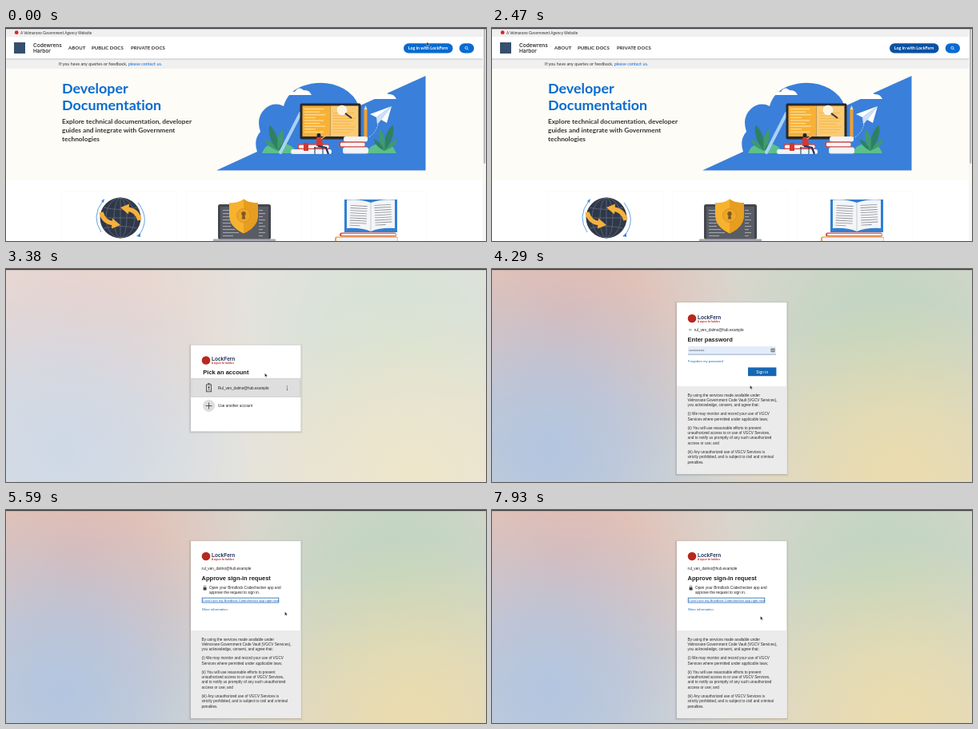
Recreate the animation shown at these times as an HTML page. Size 600 by 267 pixels, loop 8000 ms.

```html
<!DOCTYPE html>
<html lang="en">
<head>
<meta charset="utf-8">
<title>Sign-in walkthrough</title>
<style>
  html, body { margin: 0; width: 100%; height: 100%; overflow: hidden; background: #fff; }
  svg { display: block; width: 100vw; height: 100vh; }
  text { white-space: pre; font-variant-ligatures: none; }
  .lato { font-family: Lato, "Open Sans", sans-serif; }
  .inter { font-family: Inter, Roboto, sans-serif; font-weight: 600; }
  .arial { font-family: "Liberation Sans", Arial, sans-serif; }
  .b { font-weight: 700; }
</style>
</head>
<body>
<svg id="stage" viewBox="0 0 600 267" preserveAspectRatio="none"></svg>
<script>
const LOOP = 8000, STEP = 130;
const TO_ACCOUNT = 2990, TO_PASSWORD = 4160, TO_APPROVE = 5590;
const BLUE = '#086bd0', LINK = '#1068b8';
const NAMES = { land: 'Velmorane', pass: 'LockFern', mail: 'ul_ven_dalmo@hub.example' };

const rect = (x, y, w, h, fill, extra = '') =>
  `<rect x="${x}" y="${y}" width="${w}" height="${h}" fill="${fill}" ${extra}/>`;
const circle = (x, y, r, fill, extra = '') =>
  `<circle cx="${x}" cy="${y}" r="${r}" fill="${fill}" ${extra}/>`;
const path = (d, fill, extra = '') => `<path d="${d}" fill="${fill}" ${extra}/>`;
const line = (d, color, width = 1, extra = '') =>
  path(d, 'none', `stroke="${color}" stroke-width="${width}" ${extra}`);
const text = (x, y, size, str, fill = '#222', cls = 'arial', extra = '') =>
  `<text x="${x}" y="${y}" font-size="${size}" fill="${fill}" class="${cls}" ${extra}>${str}</text>`;
const group = (id, body, extra = '') => `<g id="${id}" ${extra}>${body}</g>`;
const rows = (n, draw) => Array.from({ length: n }, (_, i) => draw(i)).join('');

function leaf(x, y, angle, length, fill) {
  const w = length * 0.24;
  return path(`M0 0Q${-w} ${-length * .6} 0 ${-length}Q${w} ${-length * .6} 0 0`, fill,
    `transform="translate(${x} ${y}) rotate(${angle})"`);
}

function book(x, y, w, h, cover) {
  return rect(x, y, w, h, cover, 'rx="2.5"') +
    rect(x + 2, y + 1.2, w - 2.5, h - 2.4, '#f4f5f7', 'rx="1.5"');
}

function heroArt() {
  const plant = (x, y, dir) => [-50, -18, 12, 42].map((a, i) =>
    leaf(x, y, a * dir, [22, 34, 28, 20][i], i % 2 ? '#2f8062' : '#3f9a6d')).join('');
  const cloud = (x, y) => path(`M${x} ${y}Q${x + 4} ${y - 5} ${x + 9} ${y - 4}Q${x + 14} ${y - 12}
    ${x + 20} ${y - 6}Q${x + 27} ${y - 7} ${x + 30} ${y}Z`, '#fff');
  return path(`M263 178.5L314 155Q309 140 318 130Q312 112 324 101Q335 92 347 98Q352 80 370 73
      Q398 63 422 76Q436 84 441 98L524.5 60V178.5Z`, '#3a7fd9') +
    cloud(352, 84) + cloud(458, 89) +
    path('M320 157Q325 143 339 147Q350 139 366 157Z', '#5cc08c') +
    path('M450 157Q458 142 470 147Q482 142 488 157Z', '#5cc08c') +
    plant(340, 154, 1) + plant(473, 154, -1) +
    line('M343 156L368 107', '#a9d2f5', 4, 'stroke-linecap="round"') +
    rect(367.5, 94.5, 76, 45, '#26282f', 'rx="2"') +
    rect(370.5, 97.5, 35, 38.5, '#f9b135') + rect(405.5, 97.5, 35, 38.5, '#fbcb74') +
    rows(9, i => rect(373, 101 + i * 3.6, [24, 19, 26, 14][i % 4], 1.1, '#fde3a6')) +
    rows(8, i => rect(409, 106 + i * 3.5, [26, 22, 28][i % 3], .9, '#f6b548')) +
    circle(420, 103, 5.6, '#fff4dc', 'stroke="#f7f8fa" stroke-width="1.4"') +
    line('M424 107L432 113', '#2c3140', 2) +
    rect(447.5, 102, 4, 36, '#f3a12e') + path('M447.5 102L449.5 97L451.5 102Z', '#f9dcb0') +
    line('M465 121Q461 134 451 138', '#cfe3fa', .8, 'stroke-dasharray="2 1.5"') +
    path('M482 98L455 108L463 112Z', '#fff') + path('M482 98L463 112L464 121L469 115Z', '#cfe0f4') +
    path('M482 98L469 115L476 119Z', '#fff') +
    book(422, 136, 30, 6.5, '#f0f1f4') + book(416, 142.5, 33, 7, '#d4493f') +
    book(421, 149.5, 32, 8, '#e9ebef') +
    book(364, 145.5, 40, 6.5, '#d4493f') + book(356, 152, 51, 6, '#e9ebef') +
    rect(372, 144, 6, 10, '#d2382f') +
    line('M386 149V158M396 149V158M385 150H397', '#263250', 1) +
    path('M388 138Q391 134 395 138L396 148H388Z', '#d5372f') +
    line('M394 139L403 133', '#f2b18c', 1.3) + line('M390 148L400 150L403 158', '#22345f', 2.2) +
    circle(391, 134.5, 2.5, '#1f2333');
}

function globe() {
  const arrow = line('M119 231Q122 244 135 245', '#f6b13c', 5.5) + path('M133 238.5L143 247L132 251.5Z', '#f6b13c');
  return circle(143, 238, 25.5, '#303848') +
    [8, 18].map(r => `<ellipse cx="143" cy="238" rx="${r}" ry="25" fill="none" stroke="#65718a" stroke-width=".7"/>`).join('') +
    line('M143 213V263M118 238H168M122 225Q143 230 164 225M122 251Q143 246 164 251', '#65718a', .7) +
    arrow + group('returnArrow', arrow, 'transform="rotate(180 143 236)"') +
    line('M121 217Q106 236 119 256M165 219Q181 240 166 260', '#3b87d8', .8) +
    path('M119 217L123 214L122 219ZM163 261L168 257L168 262Z', '#3b87d8');
}

function laptop() {
  return rect(265, 221, 66, 44, '#44464d', 'rx="2.5"') + rect(268, 224, 60, 41, '#5a5c64') +
    rows(9, i => rect(271, 228 + i * 4, 9 + i * 5 % 12, 1.1, '#a4a7af') +
      rect(316, 228 + i * 4, 5 + i * 3 % 6, 1.1, '#a4a7af')) +
    rect(259, 264.5, 78, 3, '#a9abb2', 'rx="1"') +
    path('M297 214.5Q305 220 315 219V236Q314 250 297 257.5Q280 250 279 236V219Q289 220 297 214.5Z', '#f7b32f') +
    path('M297 214.5Q305 220 315 219V236Q314 250 297 257.5Z', '#e79d1f') +
    circle(297, 235, 8.5, '#eda629', 'stroke="#d08d1c" stroke-width=".7"') +
    circle(297, 232.7, 2.7, '#80591f') + path('M296 233H298L299.3 239.5H294.7Z', '#80591f');
}

function openBook() {
  const page = (x, tilt) => group('', rows(9, i => rect(x, 222 + i * 3.1, i === 8 ? 13 : 21, .8, '#8a8d94')),
    `transform="rotate(${tilt} ${x} 236)"`);
  return path('M423 215H489V256H423Z', '#2f7fd3') +
    path('M426 215.5Q444 214 456 219Q468 214 486 215.5V251Q468 250 456 255Q444 250 426 251Z', '#f4f5f6') +
    line('M456 219V255', '#b9bec8', .8) + page(430, 3) + page(461, -3) +
    book(417, 256.5, 71, 5, '#d4493f') + book(411, 261.5, 79, 7, '#f0a831');
}

function homePage() {
  const nav = (x, label) => text(x, 27.3, 6.1, label, '#333', 'lato b');
  return rect(0, 0, 600, 267, '#fff') + rect(0, 1, 600, 10, '#f0f0f0') +
    circle(13.2, 5.7, 2.4, '#e0202c') +
    text(18, 7.5, 4.8, `A ${NAMES.land} Government Agency Website`, '#333', 'lato') +
    rect(10, 18, 14, 14, '#35506f') +
    text(34, 24.2, 6.5, 'Codewrens', '#333', 'inter') + text(34, 31.2, 6.5, 'Harbor', '#333', 'inter') +
    nav(78, 'ABOUT') + nav(107, 'PUBLIC DOCS') + nav(156, 'PRIVATE DOCS') +
    rect(497, 19.2, 61.5, 12.3, BLUE, 'id="login" rx="6.15"') +
    text(527.5, 27.3, 5.4, `Log in with ${NAMES.pass}`, '#fff', 'lato b', 'text-anchor="middle"') +
    rect(566.7, 19.2, 18.3, 12.3, BLUE, 'rx="6.15"') +
    circle(575.4, 24.9, 1.6, 'none', 'stroke="#fff" stroke-width=".7"') + line('M576.6 26.1L578 27.5', '#fff', .7) +
    rect(0, 39.5, 600, 11.5, '#f0f0f1') + rect(0, 38.4, 600, 1.2, '#c8c8ca') +
    text(66, 47.2, 5.45, `If you have any queries or feedback, <tspan fill="${BLUE}">please contact us.</tspan>`, '#333', 'lato') +
    rect(0, 51, 600, 140, '#fdfcf6') +
    text(70, 82, 17.9, 'Developer', BLUE, 'lato b') + text(70, 103, 17.9, 'Documentation', BLUE, 'lato b') +
    ['Explore technical documentation, developer', 'guides and integrate with Government', 'technologies']
      .map((s, i) => text(70, 120.3 + i * 11, 8.3, s, '#333', 'lato b')).join('') +
    heroArt() +
    rows(3, i => rect(69.5 + i * 156, 204.5, 144, 80, 'none', 'stroke="#fafafa" stroke-width=".8"')) +
    globe() + laptop() + openBook() +
    rect(596, 1, 4, 266, '#f6f6f6') + rect(597, 1, 2.3, 169, '#b9b9bb', 'rx="1"');
}

function backdrop() {
  const spots = [['pink', '#e3b9b0', 90, 55, 225], ['green', '#bfd5c0', 490, 85, 205],
    ['blue', '#b2c5e0', 70, 225, 235], ['sand', '#ebdcae', 510, 262, 225]];
  return '<defs>' + spots.map(([id, color]) =>
    `<radialGradient id="${id}"><stop stop-color="${color}"/><stop offset=".4" stop-color="${color}" stop-opacity=".72"/>
     <stop offset="1" stop-color="${color}" stop-opacity="0"/></radialGradient>`).join('') + '</defs>' +
    rect(0, 0, 600, 267, '#d9d6ce') +
    spots.map(([id, , x, y, r]) => circle(x, y, r, `url(#${id})`)).join('') +
    rect(0, 0, 600, 267, '#f0f0ef', 'id="haze"');
}

const card = (y, h) => rows(3, i => rect(230.5 - i, y - i + .7, 138 + 2 * i, h + 2 * i, '#000', 'opacity=".05"')) +
  rect(231, y, 137.5, h, '#fff');
const brand = y => circle(250, y, 5.3, '#b8281f') +
  text(257, y + .8, 6.5, NAMES.pass, '#25365c', 'arial b') +
  text(257, y + 4.6, 2.8, 'A sign-in for builders', '#b8281f', 'arial b');

function accountPage() {
  return card(95.5, 108) + brand(114.5) +
    text(246.3, 132.3, 7.5, 'Pick an account', '#1b1b1b', 'arial b') +
    rect(231.7, 137.5, 136.3, 22.8, '#dedede', 'stroke="#777" stroke-width=".5" stroke-dasharray="1 1"') +
    rect(250.6, 145, 6, 8.8, 'none', 'stroke="#333" stroke-width=".8"') +
    line('M252 143.8H255.2', '#333', 1) + circle(253.6, 148.4, 1.1, '#333') + line('M252 152Q253.6 149.5 255.2 152', '#333', .7) +
    text(265, 151, 4.65, 'R' + NAMES.mail) +
    [147, 149.2, 151.4].map(y => circle(351.5, y, .55, '#333')).join('') +
    circle(253.6, 171.5, 7.6, '#dedede') + line('M249.6 171.5H257.6M253.6 167.5V175.5', '#333', .8) +
    text(265, 173.2, 4.7, 'Use another account');
}

function terms(top, height) {
  const org = 'VGCV Services';
  const paragraphs = [
    ['By using the services made available under', `${NAMES.land} Government Code Vault (${org}),`, 'you acknowledge, consent, and agree that:'],
    ['(i) We may monitor and record your use of VGCV', 'Services where permitted under applicable laws;'],
    ['(ii) You will use reasonable efforts to prevent', `unauthorized access to or use of ${org},`, 'and to notify us promptly of any such unauthorized', 'access or use; and'],
    [`(iii) Any unauthorized use of ${org} is`, 'strictly prohibited, and is subject to civil and criminal', 'penalties.']];
  let y = top + 12.6;
  return rect(231, top, 137.5, height, '#ebebeb') + paragraphs.map(p => {
    const out = p.map((s, i) => text(244.6, y + i * 6.4, 4.7, s, '#2a2a2a')).join('');
    y += p.length * 6.4 + 4.5;
    return out;
  }).join('');
}

function passwordPage() {
  return card(42, 215) + group('passwordBody', brand(62) +
    line('M250 76.2H246.6M248 74.8L246.6 76.2L248 77.6', '#444', .5) +
    text(252.8, 78, 4.65, 'r' + NAMES.mail) +
    text(244.6, 91.2, 7.5, 'Enter password', '#1b1b1b', 'arial b') +
    rect(245, 97, 110, 10, '#e2ecfb') + rect(245, 106.8, 110, .6, '#56779c') +
    rows(12, i => circle(247 + i * 1.6, 102, .6, '#333')) +
    rect(348.5, 99.6, 5, 4.6, '#777', 'rx=".6"') +
    line('M349.3 101.2H352.7M349.3 102.7H352.7', '#fff', .5) +
    text(245, 116.6, 4.2, 'Forgotten my password', LINK) +
    rect(320, 123.4, 35.4, 10.8, '#1766b3', 'id="submit"') +
    text(337.7, 130.6, 4.9, 'Sign in', '#fff', 'arial', 'text-anchor="middle"') +
    terms(147, 110));
}

function approvePage() {
  return card(39, 222) + brand(58) +
    text(244.6, 74.6, 4.65, 'r' + NAMES.mail) +
    text(244.6, 87.6, 7.5, 'Approve sign-in request', '#1b1b1b', 'arial b') +
    rect(246.6, 97, 4, 3.6, '#4a3b32', 'rx=".7"') + line('M247.5 97V95.7Q248.6 94 249.7 95.7V97', '#4a3b32', .7) +
    text(254, 98.6, 4.7, 'Open your Brindlock Codechecker app and') +
    text(254, 105.1, 4.7, 'approve the request to sign in.') +
    rect(245.2, 110.2, 95.6, 5.8, '#fff', 'stroke="#1b62b5" stroke-width=".8"') +
    text(246, 114.7, 4.15, 'I can\'t use my Brindlock Codechecker app right now', LINK) +
    text(245.3, 126, 4.2, 'More information', LINK) + terms(151, 110);
}

const stage = document.getElementById('stage');
stage.innerHTML = group('home', homePage()) +
  group('signin', backdrop() + group('account', accountPage()) +
    group('password', passwordPage()) + group('approve', approvePage())) +
  rect(0, 0, 600, 1.2, '#3a3c42') +
  group('cursor',
    group('arrow', path('M0 0V4.7L1.1 3.7L1.9 5.4L2.7 5L1.9 3.4H3.4Z', '#111', 'stroke="#fff" stroke-width=".4"')) +
    group('hand', path('M-.6 0Q0 -.7 .6 0V2L2.6 2.6V4.3L2 5.6H-.8L-2 3.5L-1.4 3L-.6 3.7Z', '#fff', 'stroke="#111" stroke-width=".5"')));

const el = id => document.getElementById(id);
const show = (id, on) => el(id).setAttribute('display', on ? 'inline' : 'none');
const set = (id, name, value) => el(id).setAttribute(name, value);
const clamp = v => Math.max(0, Math.min(1, v));
const smooth = v => v * v * (3 - 2 * v);

// time, x, y
const CURSOR = [[0, 526, 17.5], [780, 529.5, 30.5], [2600, 529.5, 30.5], [3250, 323.5, 130.5],
  [3380, 323.5, 130.5], [3770, 321, 147], [4160, 321, 147], [5070, 348.5, 127.5],
  [5590, 348.5, 127.5], [6110, 350.5, 120], [6500, 350.5, 120], [7670, 335.5, 133]];

function cursorAt(t) {
  const next = CURSOR.findIndex(k => k[0] > t);
  if (next < 0) return CURSOR.at(-1).slice(1);
  const [t0, x0, y0] = CURSOR[next - 1], [t1, x1, y1] = CURSOR[next];
  const p = smooth((t - t0) / (t1 - t0));
  return [x0 + (x1 - x0) * p, y0 + (y1 - y0) * p];
}

function render(time) {
  const t = Math.floor(time % LOOP / STEP) * STEP;
  const page = t < TO_ACCOUNT ? 'home' : t < TO_PASSWORD ? 'account' : t < TO_APPROVE ? 'password' : 'approve';
  show('home', page === 'home');
  show('signin', page !== 'home');
  ['account', 'password', 'approve'].forEach(id => show(id, id === page));

  const [x, y] = cursorAt(t);
  const overLogin = page === 'home' && t >= 520;
  const overRow = page === 'account' && y > 137;
  set('login', 'fill', overLogin ? '#0a51a3' : BLUE);
  set('haze', 'opacity', .65 * clamp((TO_PASSWORD - t) / (TO_PASSWORD - TO_ACCOUNT)));
  set('passwordBody', 'opacity', t >= 5070 ? .8 : 1);
  set('submit', 'fill', t >= 4940 ? '#0f5192' : '#1766b3');

  set('cursor', 'transform', `translate(${x} ${y})`);
  show('cursor', t < 1690 || t >= 2730);
  show('hand', overLogin || overRow);
  show('arrow', !overLogin && !overRow);
}

const start = performance.now();
function tick() {
  render(performance.now() - start);
  requestAnimationFrame(tick);
}
render(0);
tick();
</script>
</body>
</html>
```
